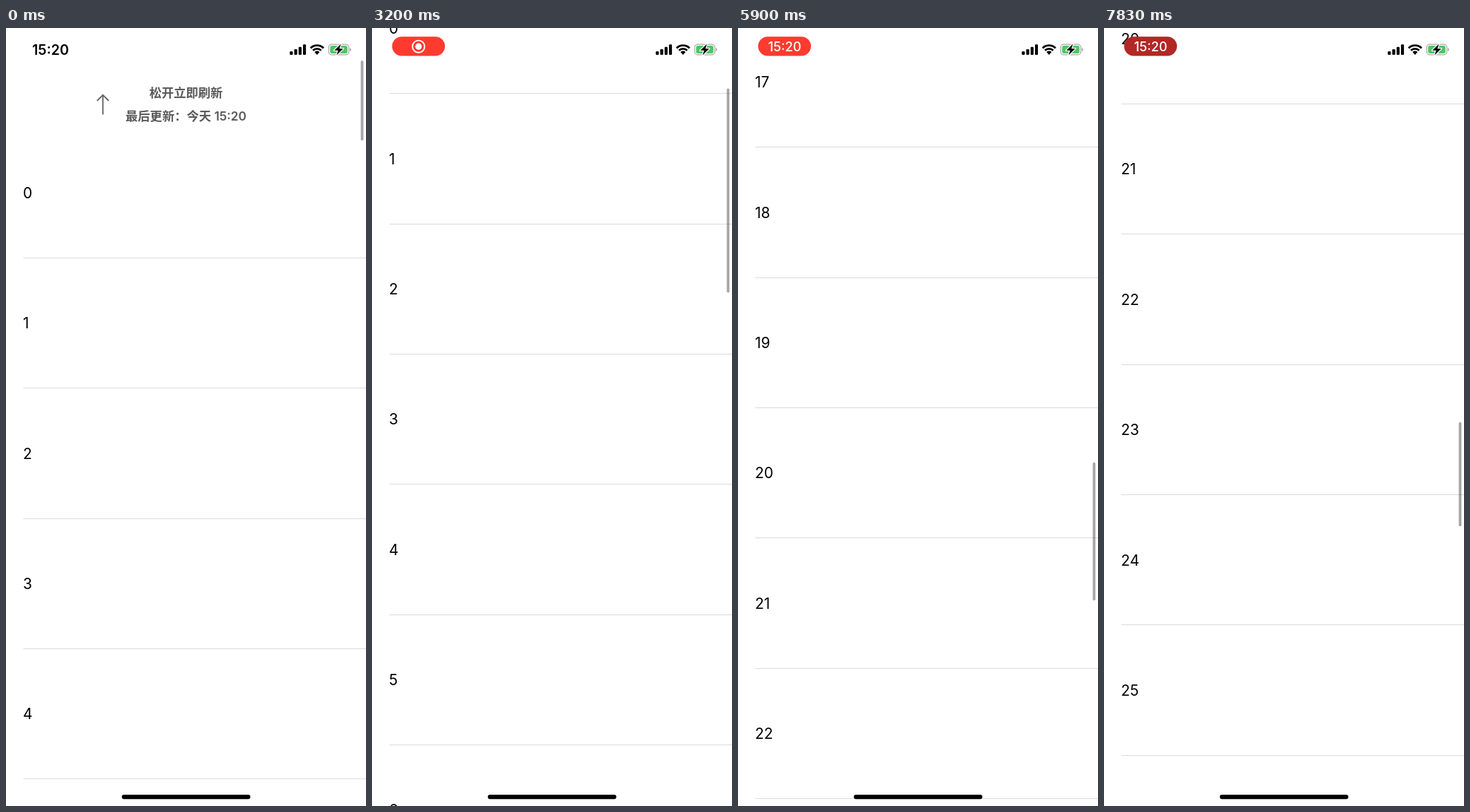
These frames come from a looping animation (509x1101 px, 7870 ms). An HTML page with a canvas:

```html
<!DOCTYPE html>
<html lang="zh">
<head>
<meta charset="utf-8">
<style>
html, body { margin: 0; width: 100%; height: 100%; overflow: hidden; background: #fff; }
canvas { display: block; }
</style>
</head>
<body>
<canvas id="c" width="509" height="1101"></canvas>
<script>
const LOOP = 7870, ROW = 184.35, REST = 59, HEADER = 66.4;
const FONT = 'Inter, "Noto Sans CJK SC", "Noto Sans CJK", sans-serif';
const g = document.getElementById('c').getContext('2d');

const clamp = x => Math.max(0, Math.min(1, x));
const mix = (a, b, u) => a + (b - a) * u;
const ease = u => { u = clamp(u); return u * u * (3 - 2 * u); };
const decay = (t, t0) => Math.exp((t0 - t) / 500);

// piecewise linear value through [time, value] points
function along(t, pts) {
  let i = 1;
  while (i < pts.length - 1 && t > pts[i][0]) i++;
  const [t0, a] = pts[i - 1], [t1, b] = pts[i];
  return mix(a, b, clamp((t - t0) / (t1 - t0)));
}

// y of the first row's upper edge: pull, refresh, slow drag, two flicks
function listTop(t) {
  if (t < 350) return mix(141, 144, ease(t / 250));
  if (t < 1300) return mix(144, REST + HEADER, ease((t - 350) / 250));
  if (t < 1970) return mix(REST + HEADER, REST, ease((t - 1300) / 400));
  if (t < 3405) return along(t, [[1970, REST], [2370, -16.3], [2730, -77], [3405, -98]]);
  if (t < 3505) return -98 - 190 * ((t - 3405) / 100) ** 2;
  if (t < 5380) return -2185 + 612.4 * decay(t, 4070);
  if (t < 5460) return -2140 - 121 * ((t - 5380) / 80) ** 2;
  return -3777 + 146 * decay(t, 6630);
}

function rowCount(t) {
  if (t < 1300) return 30;
  return t < 4369 ? 20 : t < 6900 ? 30 : 40;
}

function text(s, x, y, size, weight, color, align = 'center') {
  g.font = `${weight} ${size}px ${FONT}`;
  g.textAlign = align;
  g.fillStyle = color;
  g.fillText(s, x, y);
}

function pillShape(x, y, w, h, r, color) {
  g.fillStyle = color;
  g.beginPath();
  g.roundRect(x, y, w, h, r);
  g.fill();
}

function line(pts, width, color) {
  g.lineWidth = width;
  g.strokeStyle = color;
  g.beginPath();
  pts.forEach(p => g.lineTo(...p));
  g.stroke();
}

function drawRows(top, count) {
  for (let i = 0; i < count; i++) {
    const y = top + i * ROW;
    if (y > 1101 || y < -ROW - 5) continue;
    text(i, 24, y + 99.9, 20.9, 400, '#000', 'left');
    g.fillStyle = '#dadadc';
    g.fillRect(24.5, Math.floor(y + ROW), 485, 1);
  }
}

function drawHeader(t, top) {
  if (t >= 1700) return;
  const loading = t >= 350, y = top - 33, gray = '#5a5a5a';
  g.globalAlpha = 1 - ease((t - 1300) / 300);
  text(loading ? '正在刷新数据中...' : '松开立即刷新', 254.5, top - 43.3, 17.3, 600, gray);
  text('最后更新：今天 15:20', 254.5, top - 10.3, 17.3, 600, gray);
  g.lineCap = 'round';
  if (loading) {
    const step = Math.floor(t / 100) + 1;
    for (let i = 0; i < 8; i++) {
      const a = i * Math.PI / 4, age = (step - i + 80) % 8;
      const v = Math.min(229, 158 + age * 18);
      const spoke = [7, 11].map(r => [136.7 + r * Math.cos(a), y + r * Math.sin(a)]);
      line(spoke, 3, `rgb(${v},${v},${v})`);
    }
  } else {
    g.lineCap = 'butt';
    line([[137, y + 14.5], [137, y - 13]], 1.8, '#666');
    line([[128.7, y - 5], [137, y - 13.2], [145.3, y - 5]], 1.8, '#666');
  }
  g.globalAlpha = 1;
}

function drawScrollbar(t, top, count) {
  const inset = t < 1300 ? HEADER * ease((t - 350) / 250) : HEADER * (1 - ease((t - 1300) / 400));
  const size = count * ROW + 155 + inset, past = top - REST - inset;
  const y = 46 + Math.max(0, -past) * 1008 / size;
  const h = 1008 * 1101 / size - Math.max(0, past);
  pillShape(501.6, y, 3.8, h, 1.9, 'rgba(0,0,0,.35)');
}

function drawClock(t) {
  const shown = ease((t - 350) / 250), toTime = ease((t - 3200) / 250);
  g.globalAlpha = 1 - shown;
  text('15:20', 63, 37.5, 19.7, 600, '#000');
  const dark = along(t, [[600, 0], [1000, .44], [1650, 0], [4300, 0], [5130, .44],
    [5700, 0], [6500, .1], [6630, .2], [7130, 0], [7830, 1]]);
  g.globalAlpha = shown;
  const rgb = [255, 59, 48].map((v, i) => Math.round(mix(v, [177, 40, 36][i], dark)));
  pillShape(28.4, 12.2, 74.8, 27.2, 13.6, `rgb(${rgb})`);
  g.globalAlpha = shown * (1 - toTime);
  g.strokeStyle = g.fillStyle = '#fff';
  g.lineWidth = 1.9;
  g.beginPath();
  g.arc(65.8, 26.2, 8.6, 0, 7);
  g.stroke();
  g.beginPath();
  g.arc(65.8, 26.2, 4.6, 0, 7);
  g.fill();
  g.globalAlpha = shown * toTime;
  text('15:20', 66, 32.8, 18.2, 500, '#fff');
  g.globalAlpha = 1;
}

function drawStatus() {
  [5, 8, 11.3, 14.8].forEach((h, i) => pillShape(401.3 + i * 6.2, 38 - h, 4.2, h, 1.2, '#000'));

  g.lineCap = 'butt';
  g.strokeStyle = g.fillStyle = '#000';
  g.lineWidth = 2.8;
  const from = -Math.PI * .75, to = -Math.PI / 4;
  for (const r of [12.9, 8.2]) {
    g.beginPath();
    g.arc(439.8, 37.6, r, from, to);
    g.stroke();
  }
  g.beginPath();
  g.moveTo(439.8, 38);
  g.arc(439.8, 37.6, 5, from, to);
  g.fill();

  g.strokeStyle = '#a6a6a6';
  g.lineWidth = 1.2;
  g.beginPath();
  g.roundRect(456.2, 23.1, 28.6, 14.8, 4.4);
  g.stroke();
  pillShape(458.2, 25.1, 24.6, 10.8, 2.6, '#4cc764');
  pillShape(486.2, 28.2, 1.7, 4.6, [0, 1.7, 1.7, 0], '#a6a6a6');
  g.beginPath();
  [[473.6, 22.6], [464.2, 31.8], [469.6, 31.8], [467.4, 38.6], [476.8, 29.2], [471.4, 29.2]]
    .forEach(p => g.lineTo(...p));
  g.closePath();
  g.lineJoin = 'round';
  g.strokeStyle = '#fff';
  g.lineWidth = 2.6;
  g.stroke();
  g.fillStyle = '#000';
  g.fill();
  g.lineJoin = 'miter';
}

function draw(now) {
  const t = now % LOOP, top = listTop(t), count = rowCount(t);
  g.fillStyle = '#fff';
  g.fillRect(0, 0, 509, 1101);
  drawRows(top, count);
  drawHeader(t, top);
  drawScrollbar(t, top, count);
  drawClock(t);
  drawStatus();
  pillShape(163.7, 1085, 181.8, 6.2, 3.1, '#000');
}

const start = performance.now();
function tick() {
  draw(performance.now() - start);
  requestAnimationFrame(tick);
}
tick();
</script>
</body>
</html>
```
